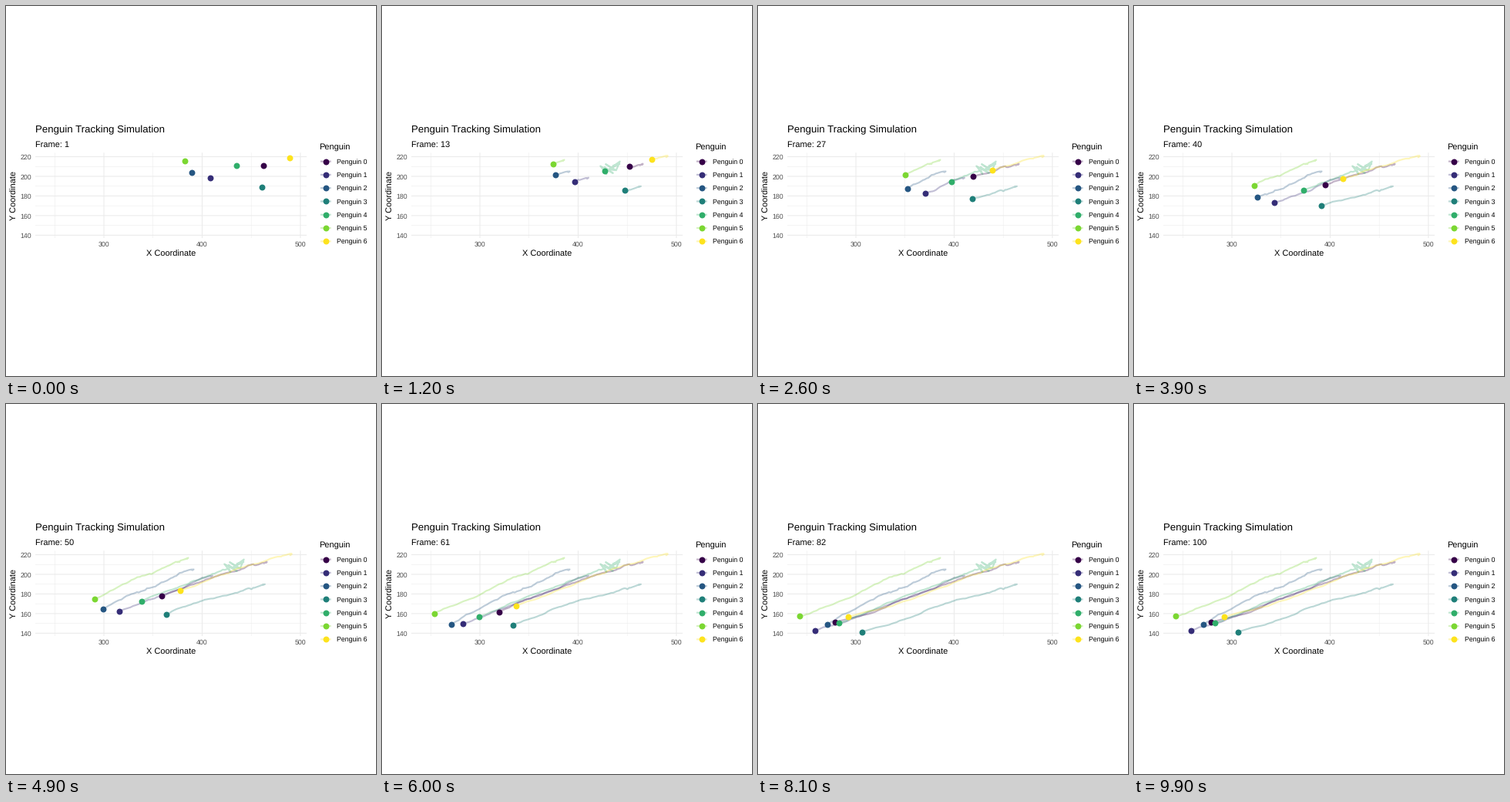
Animation, 480 px wide and 480 px high, one loop 10000 ms. Source, as a matplotlib script:

```python
import numpy as np
import matplotlib.pyplot as plt
from matplotlib.animation import FuncAnimation

plt.rcParams.update({"font.family": "Liberation Sans", "text.hinting": "none",
                     "path.simplify": False})

SIZE, DPI, FRAMES = 480, 72, 100
LEFT, RIGHT, TOP, BOTTOM = 38, 390, 190.3, 301
KEYS = [0, 12, 26, 39, 60, 66]  # steps at which the waypoints are reached
steps = np.arange(KEYS[-1] + 1)
rng = np.random.default_rng(4)

fig = plt.figure(figsize=(SIZE / DPI, SIZE / DPI), dpi=DPI, facecolor="white")
ax = fig.add_axes([0, 0, 1, 1])
ax.set(xlim=(0, SIZE), ylim=(SIZE, 0))
ax.axis("off")


def label(x, y, s, size, color="black", **kw):
    return ax.text(x, y, s, fontsize=size, color=color, va="baseline", **kw)


def px(v):
    return 127.0 + (v - 300) * 1.2745


def py(v):
    return 195.5 + (220 - v) * 1.2735


def draw_grid():
    style = dict(color="#EBEBEB", solid_capstyle="butt", snap=False)
    for v in range(250, 501, 50):
        ax.plot([px(v)] * 2, [TOP, BOTTOM], lw=0.53 if v % 100 else 1.07, **style)
    for v in range(140, 221, 10):
        ax.plot([LEFT, RIGHT], [py(v)] * 2, lw=0.53 if v % 20 else 1.07, **style)
    for v in (300, 400, 500):
        label(px(v), 312, v, 8.8, "#4D4D4D", ha="center")
    for v in range(140, 221, 20):
        label(33.1, py(v) + 3.5, v, 8.8, "#4D4D4D", ha="right")


def add_trail(x, y, color):
    return ax.plot(x, y, color=color, alpha=0.3, lw=2.13, zorder=3, snap=False,
                   solid_capstyle="butt", solid_joinstyle="round")[0]


def add_dot(x, y, color, zorder=4):
    return ax.plot(x, y, "o", color=color, ms=7.9, mew=0, zorder=zorder,
                   snap=False)[0]


def roam(points, rough):
    """Linear travel through the waypoints plus a random walk pinned to them."""
    walk = np.cumsum(rng.normal(0, rough, len(steps)))
    return np.interp(steps, KEYS, points - walk[KEYS]) + walk


class Penguin:
    def __init__(self, order, color, xs, ys, sway=0):
        # Each starts with a short step back; sway adds early zigzags.
        back = np.where(steps < 6, np.sin(np.pi * steps / 6), 0)
        zigzag = np.where(steps < 12, sway, 0)
        self.x = roam(np.array(xs), 0.35) + 7 * back + zigzag * np.sin(2.3 * steps)
        self.y = roam(np.array(ys), 0.5) - 2 * back + zigzag * 0.6 * np.sin(3.6 * steps)
        self.trail = add_trail([], [], color)
        self.dot = add_dot([], [], color, 5 + order)

        y = 201.6 + 17.28 * order
        add_trail([407.9, 421.7], [y, y], color)
        add_dot([414.8], [y], color)
        label(429, y + 3.2, f"Penguin {order}", 8.8)

    def show(self, i):
        n = min(i + 1, len(steps))
        self.trail.set_data(self.x[:n], self.y[:n])
        self.dot.set_data(self.x[n - 1:n], self.y[n - 1:n])


draw_grid()
label(LEFT, 164.3, "Penguin Tracking Simulation", 13.2)
label(214, 324.7, "X Coordinate", 11, ha="center")
label(13.4, 246, "Y Coordinate", 11, ha="center", rotation=90,
      rotation_mode="anchor")
label(406.2, 186.6, "Penguin", 11)
counter = label(LEFT, 183.3, "", 11)

penguins = [
    Penguin(0, "#360048", [334, 320.5, 279, 247.5, 151.7, 100.2],
            [206.9, 207.8, 221.1, 232.2, 269.8, 282.8]),
    Penguin(1, "#352D77", [264.8, 249.7, 216.8, 182.4, 105.2, 73.7],
            [223.4, 228.2, 243, 255.2, 285.2, 293.5]),
    Penguin(2, "#255682", [240.7, 225.2, 194, 160, 89.8, 89.8],
            [216, 219.1, 236.7, 247.8, 286.1, 286.1]),
    Penguin(3, "#1F7F79", [332, 314.8, 278.3, 243.3, 170, 135.2],
            [235.2, 239, 249.7, 258.6, 286.5, 295.5]),
    Penguin(4, "#30AE6A", [299, 289.3, 251.3, 220.4, 126.2, 104.7],
            [207.2, 213.6, 227.6, 239, 276.1, 283.6], sway=9),
    Penguin(5, "#7BD732", [232, 222.4, 191.4, 155.8, 67.9, 54],
            [201, 205.2, 219.1, 232.6, 271.5, 274.8]),
    Penguin(6, "#FDE31D", [368, 350.2, 303.6, 271, 174, 116.5],
            [196.7, 198.5, 212.6, 224.2, 262.2, 276.3]),
]


def update(i):
    counter.set_text(f"Frame: {i + 1}")
    for p in penguins:
        p.show(i)


anim = FuncAnimation(fig, update, frames=FRAMES, interval=100, repeat=True)
plt.show()
```
